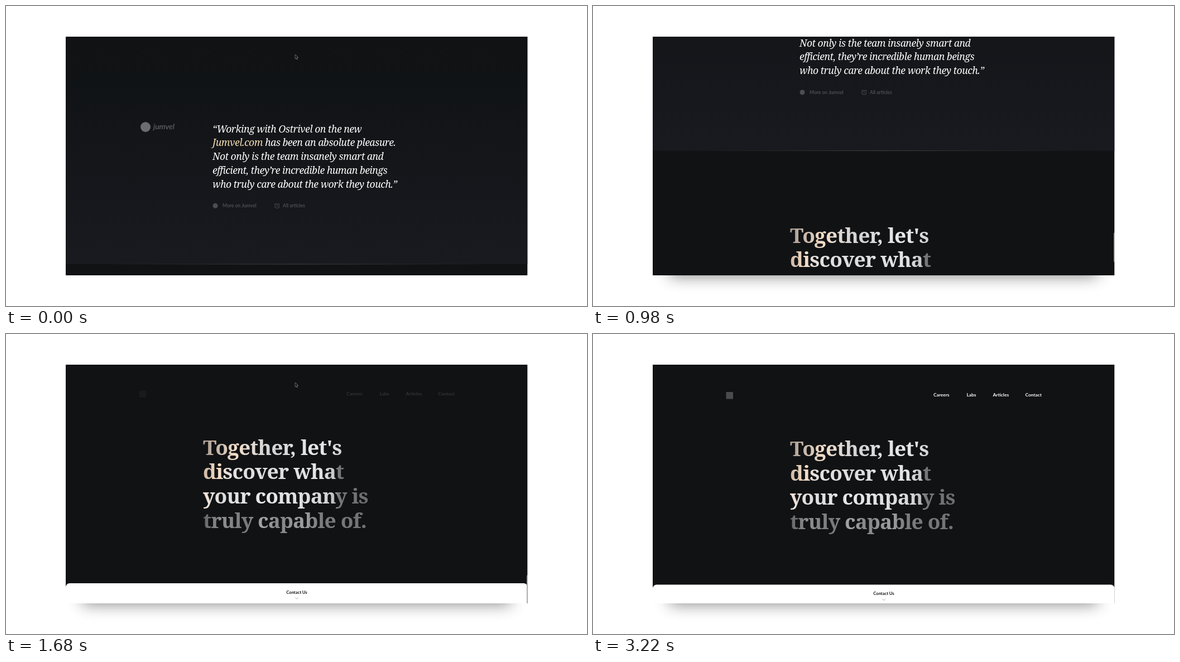
Animation of 1041 by 538 pixels, one loop 4970 ms. Source, as an HTML page with a canvas:

```html
<!DOCTYPE html>
<html lang="en">
<head>
<meta charset="utf-8">
<title>Scrolling to the closing section</title>
<style>
  html, body { margin: 0; width: 100%; height: 100%; overflow: hidden; background: #fff; }
  canvas { display: block; }
</style>
</head>
<body>
<canvas id="stage" width="1041" height="538"></canvas>
<script>
const ctx = document.getElementById('stage').getContext('2d');
const LOOP = 4970, STEP = 70;
const PANEL = { x: 107, y: 55, w: 827.5, h: 428 };
const SECTION_END = 463;

// [time in ms, scroll offset in px]; the last part is the bounce at the page end
const SCROLL = [
  [210, 0], [280, 2], [350, 8], [490, 31], [700, 77.5], [770, 91], [840, 128],
  [980, 203.5], [1120, 258], [1330, 322.5], [1470, 371], [1540, 392],
  [1610, 406], [1680, 411.5], [1750, 411.8], [1960, 409.5], [2450, 409]
];

const QUOTE = [
  '“Working with Ostrivel on the new',
  [['Jumvel.com', '#f3dfb4'], [' has been an absolute pleasure.', '#fff']],
  'Not only is the team insanely smart and',
  'efficient, they’re incredible human beings',
  'who truly care about the work they touch.”'
];

// Each heading line has its own run of tones: [x, colour]
const HEADING = [
  ['Together, let\'s', [[353, '#a99c91'], [385, '#cdbdaf'], [412, '#f2dcc6'], [440, '#e2d9d3'], [475, '#d2d3d6'], [560, '#e9e9eb'], [606, '#cfd0d2']]],
  ['discover what', [[353, '#cdb8a5'], [380, '#f3dcc5'], [398, '#e4e0dd'], [480, '#dcdde0'], [560, '#e4e4e6'], [588, '#c9c9cb'], [596, '#747577']]],
  ['your company is', [[353, '#f0e3d8'], [390, '#dcdcde'], [460, '#e8e8ea'], [570, '#d8d8da'], [586, '#c2c2c4'], [596, '#77787a'], [652, '#6b6c6e']]],
  ['truly capable of.', [[353, '#646567'], [385, '#8f8f91'], [430, '#77787a'], [460, '#a6a6a8'], [490, '#858587'], [535, '#a0a0a2'], [560, '#7b7c7e'], [644, '#727375']]]
];

const NAV = [['Careers', 610], ['Labs', 669.5], ['Articles', 716.5], ['Contact', 774.5]];

const clamp01 = v => Math.max(0, Math.min(1, v));
const ramp = (t, from, to) => clamp01((t - from) / (to - from));

function track(keys, t) {
  if (t <= keys[0][0]) return keys[0][1];
  for (let i = 1; i < keys.length; i++) {
    const [t0, v0] = keys[i - 1], [t1, v1] = keys[i];
    if (t <= t1) return v0 + (v1 - v0) * (t - t0) / (t1 - t0);
  }
  return keys[keys.length - 1][1];
}

function setFont(font, spacing = 0) {
  ctx.font = font;
  ctx.letterSpacing = spacing + 'px';
}

function text(str, x, y, fill) {
  ctx.fillStyle = fill;
  ctx.fillText(str, x, y);
}

function gradient(x0, y0, x1, y1, stops) {
  const g = ctx.createLinearGradient(x0, y0, x1, y1);
  stops.forEach(([at, color]) => g.addColorStop(at, color));
  return g;
}

function dot(x, y, r, fill) {
  ctx.fillStyle = fill;
  ctx.beginPath();
  ctx.arc(x, y, r, 0, Math.PI * 2);
  ctx.fill();
}

function polyline(points, color, width, close = false) {
  ctx.beginPath();
  points.forEach(([x, y]) => ctx.lineTo(x, y));
  if (close) ctx.closePath();
  ctx.strokeStyle = color;
  ctx.lineWidth = width;
  ctx.stroke();
}

function drawShadow(opacity) {
  ctx.save();
  ctx.shadowColor = `rgba(0,0,0,${0.46 * opacity})`;
  ctx.shadowBlur = 28;
  ctx.shadowOffsetY = 1000;
  ctx.fillRect(137, -560, 767, 45);
  ctx.restore();
}

function drawQuoteSection() {
  ctx.fillStyle = gradient(0, PANEL.y, 0, SECTION_END,
    [[0, '#111214'], [0.2, '#101315'], [0.55, '#15161a'], [1, '#191a1f']]);
  ctx.fillRect(PANEL.x, PANEL.y, PANEL.w, SECTION_END - PANEL.y);
  ctx.fillStyle = gradient(PANEL.x, 0, PANEL.x + PANEL.w, 0,
    [[0.1, '#44413f00'], [0.5, '#44413f'], [0.9, '#44413f00']]);
  ctx.fillRect(PANEL.x, SECTION_END - 0.5, PANEL.w, 1);

  dot(250, 217, 9, '#6c6d6f');
  setFont('italic 14px Lato, sans-serif');
  text('jumvel', 264, 221, '#6c6d6f');

  setFont('italic 17.5px "Noto Serif", serif', -0.45);
  QUOTE.forEach((line, i) => {
    let x = 370;
    for (const [str, color] of Array.isArray(line) ? line : [[line, '#fff']]) {
      text(str, x, 226.5 + i * 24.75, color);
      x += ctx.measureText(str).width;
    }
  });

  const muted = '#4c4d50';
  setFont('bold 8.5px Lato, sans-serif');
  dot(375, 358.3, 4.5, muted);
  text('More on Jumvel', 388, 361, muted);
  polyline([[482, 354.5], [485.6, 355.5], [489.2, 354.5], [489.2, 361.5], [485.6, 362.5], [482, 361.5]], muted, 1, true);
  polyline([[485.6, 356], [485.6, 360]], muted, 1);
  text('All articles', 496, 361, muted);
}

function drawClosingSection(navOpacity) {
  ctx.globalAlpha = navOpacity;
  ctx.fillStyle = '#4a4b4d';
  ctx.fillRect(238.5, 513, 12.5, 12.5);
  setFont('bold 8.4px Lato, sans-serif');
  NAV.forEach(([label, x]) => text(label, x, 521.3, '#fff'));
  ctx.globalAlpha = 1;

  setFont('bold 37px "Noto Serif", serif', -0.85);
  HEADING.forEach(([line, tones], i) => {
    const stops = tones.map(([x, color]) => [(x - 353) / 300, color]);
    text(line, 353, 628 + i * 43.7, gradient(353, 0, 653, 0, stops));
  });

  ctx.fillStyle = '#fff';
  ctx.beginPath();
  ctx.roundRect(PANEL.x, 858.5, PANEL.w, 120, 7);
  ctx.fill();
  setFont('bold 7.6px Lato, sans-serif');
  ctx.textAlign = 'center';
  text('Contact Us', 521, 877.3, '#111214');
  ctx.textAlign = 'left';
  polyline([[518.3, 884.3], [521, 886.7], [523.7, 884.3]], '#a5a5a7', 0.9);
}

function drawScrollbar(scroll, opacity) {
  ctx.globalAlpha = opacity;
  const drawerTop = 858.5 - scroll;
  ctx.fillStyle = '#e2e2e2';
  ctx.fillRect(933, drawerTop, 1, 200);
  ctx.fillStyle = '#a2a2a2';
  ctx.fillRect(933, 381.3 + scroll * 0.125, 2, 52);
  ctx.globalAlpha = 1;
}

function drawCursor(t, scroll) {
  if (t >= 2940) return;
  if (scroll > 117 && scroll < 241) {
    polyline([[519, 87], [521, 88], [523, 87]], '#8b8b8d', 0.8);
    polyline([[521, 88], [521, 94]], '#8b8b8d', 0.8);
    polyline([[519, 95], [521, 94], [523, 95]], '#8b8b8d', 0.8);
    return;
  }
  const moved = ramp(t, 2730, 2870);
  ctx.save();
  ctx.translate(518.3 + 13 * moved, 87 - 20 * moved);
  ctx.fillStyle = '#111214';
  polyline([[0, 0], [0, 7.4], [1.6, 6], [2.8, 8.6], [3.9, 8.1], [2.8, 5.6], [4.9, 5.4]], '#d8d8d8', 0.9, true);
  ctx.fill();
  ctx.restore();
}

function draw(t) {
  const scroll = track(SCROLL, t);
  ctx.fillStyle = '#fff';
  ctx.fillRect(0, 0, 1041, 538);
  drawShadow(ramp(t, 210, 980));

  ctx.save();
  ctx.beginPath();
  ctx.rect(PANEL.x, PANEL.y, PANEL.w, PANEL.h);
  ctx.clip();
  ctx.fillStyle = '#111214';
  ctx.fillRect(PANEL.x, PANEL.y, PANEL.w, PANEL.h);
  ctx.save();
  ctx.translate(0, -scroll);
  drawQuoteSection();
  drawClosingSection(ramp(t, 1470, 2520) ** 1.2);
  ctx.restore();
  if (t >= 280) drawScrollbar(scroll, 1 - ramp(t, 2100, 2450));
  drawCursor(t, scroll);
  ctx.restore();
}

function tick() {
  const t = performance.now() % LOOP;
  draw(Math.floor(t / STEP) * STEP);
  requestAnimationFrame(tick);
}
tick();
</script>
</body>
</html>
```
